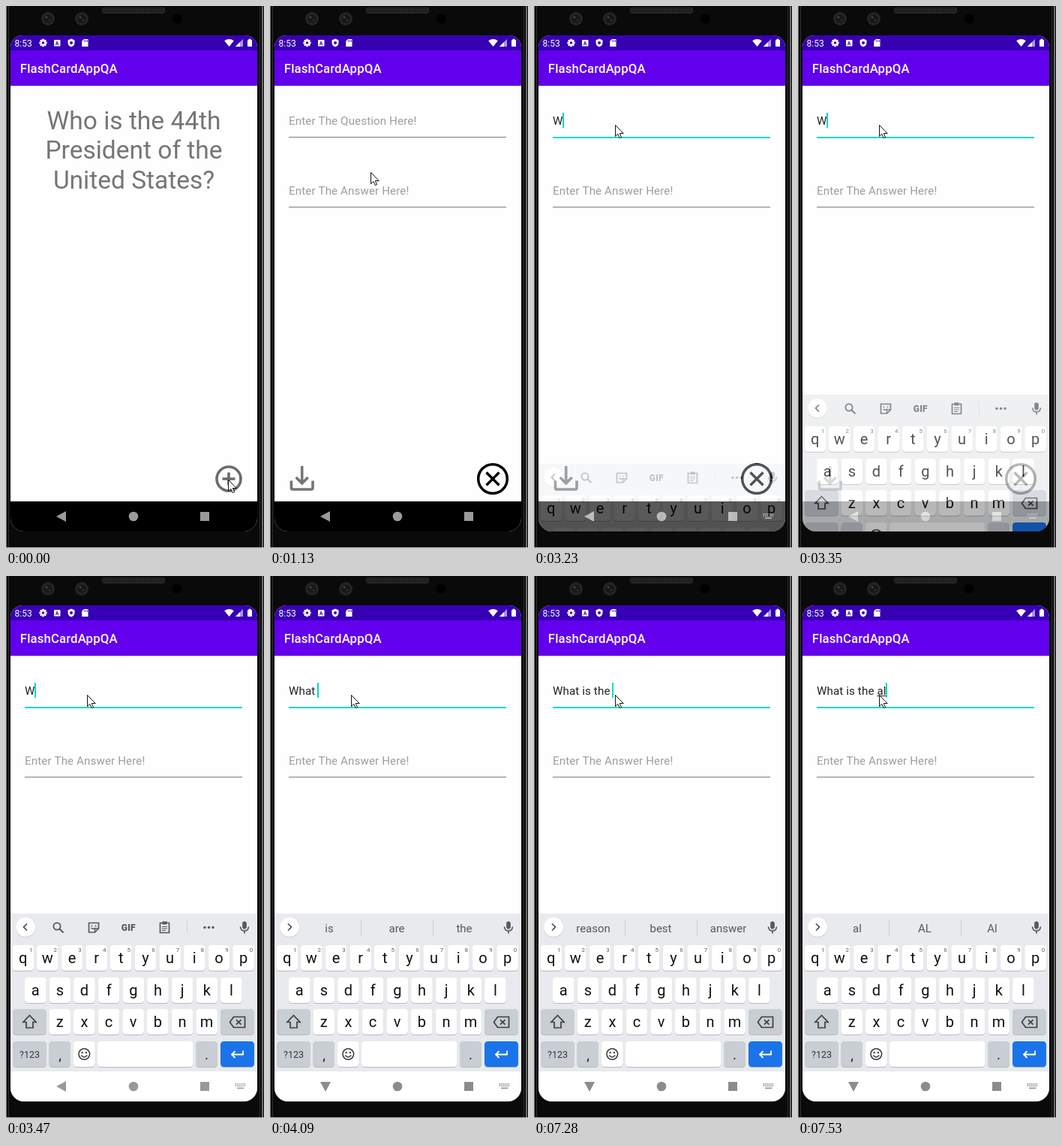
Write an HTML page with a canvas that moves like this. It is 344 px wide and 721 px high and loops after 8000 ms.

```html
<!DOCTYPE html>
<html lang="en">
<head>
<meta charset="utf-8">
<title>Flash card app</title>
<style>
  html, body { margin: 0; width: 100%; height: 100%; overflow: hidden; background: #0a0a0a; }
  canvas { display: block; width: 344px; height: 721px; }
</style>
</head>
<body>
<canvas id="stage"></canvas>
<script>
const W = 344, H = 721, LOOP = 8000;
const ratio = window.devicePixelRatio || 1;

function sized(canvas) {
  canvas.width = W * ratio;
  canvas.height = H * ratio;
  return canvas.getContext('2d');
}
const stage = sized(document.getElementById('stage'));
const layer = sized(document.createElement('canvas'));
let ctx = stage;

const GREY = '#757575', TEAL = '#03dac5', ICON = '#55595e', KEY_BG = '#e8eaed', KEY_DARK = '#c9cdd4';
const FONT = 'Roboto, "Open Sans", sans-serif';

// Screen state: each step overrides the values before it.
const start = {
  form: 0, cursor: [296, 630], focus: false, pressed: false, caret: false,
  imeIcon: false, drop: 0, board: 0, text: '', under: 0, strip: null, turn: 0
};
const steps = [
  [280, { form: 0.5 }],
  [400, { form: 1, cursor: [290, 592] }],
  [520, { cursor: [272, 512] }],
  [890, { cursor: [243, 425] }],
  [1010, { cursor: [172, 285] }],
  [1130, { cursor: [134, 221] }],
  [1380, { cursor: [110, 155] }],
  [1530, { cursor: [110, 146] }],
  [1650, { cursor: [109, 143] }],
  [1770, { cursor: [108, 151] }],
  [1890, { cursor: [108, 158] }],
  [2280, { focus: true, pressed: true, caret: true }],
  [2560, { pressed: false }],
  [2950, { caret: false, imeIcon: true }],
  [3230, { text: 'W', caret: true, drop: 160, board: 0.35 }],
  [3350, { drop: 68, board: 0.72 }],
  [3470, { drop: 0, board: 1 }],
  [3590, { text: 'Wh', under: 2, strip: ['Who', 'What', 'Why'] }],
  [3730, { text: 'Wha', under: 3, strip: ['Wha', 'What', 'Why'], turn: 0.5 }],
  [3850, { text: 'What', under: 4, strip: ['what', 'What', 'Why'], turn: 1 }],
  [4090, { text: 'What ', under: 0, strip: ['is', 'are', 'the'] }],
  [4240, { text: 'What i', under: 1, strip: ['I', 'is', 'it'] }],
  [4360, { text: 'What is', under: 2, strip: ['I', 'is', 'its'] }],
  [4480, { text: 'What is ', under: 0 }],
  [4600, { strip: ['it', 'the', 'your'] }],
  [4850, { text: 'What is th', under: 2 }],
  [7280, { text: 'What is the ', under: 0, strip: ['reason', 'best', 'answer'] }],
  [7400, { text: 'What is the a', under: 1, strip: ['a', 'A', 'and'] }],
  [7530, { text: 'What is the al', under: 2, strip: ['al', 'AL', 'Al'] }]
];

function stateAt(t) {
  const s = { ...start };
  for (const [at, change] of steps) if (t >= at) Object.assign(s, change);
  return s;
}

function rect(x, y, w, h, fill, r = 0) {
  ctx.fillStyle = fill;
  ctx.beginPath();
  ctx.roundRect(x, y, w, h, r);
  ctx.fill();
}

function disc(x, y, r, fill) {
  ctx.fillStyle = fill;
  ctx.beginPath();
  ctx.arc(x, y, r, 0, Math.PI * 2);
  ctx.fill();
}

function ring(x, y, r, width, color) {
  ctx.strokeStyle = color;
  ctx.lineWidth = width;
  ctx.beginPath();
  ctx.arc(x, y, r, 0, Math.PI * 2);
  ctx.stroke();
}

function stroke(d, width, color, x = 0, y = 0) {
  ctx.save();
  ctx.translate(x, y);
  ctx.strokeStyle = color;
  ctx.lineWidth = width;
  ctx.stroke(new Path2D(d));
  ctx.restore();
}

function fill(d, color, x = 0, y = 0, angle = 0) {
  ctx.save();
  ctx.translate(x, y);
  ctx.rotate(angle);
  ctx.fillStyle = color;
  ctx.fill(new Path2D(d));
  ctx.restore();
}

function label(str, x, y, size, color, align = 'left', weight = 400, spacing = 0) {
  ctx.font = `${weight} ${size}px ${FONT}`;
  ctx.letterSpacing = spacing + 'px';
  ctx.textAlign = align;
  ctx.fillStyle = color;
  ctx.fillText(str, x, y);
}

// Blends a whole drawing at once, so overlapping parts do not show through.
function faded(alpha, dy, paint) {
  if (!alpha) return;
  ctx = layer;
  ctx.setTransform(ratio, 0, 0, ratio, 0, 0);
  ctx.clearRect(0, 0, W, H);
  ctx.translate(0, dy);
  paint();
  ctx = stage;
  ctx.globalAlpha = alpha;
  ctx.drawImage(layer.canvas, 0, 0, W, H);
  ctx.globalAlpha = 1;
}

function drawPhone() {
  rect(0, 0, W, H, '#0a0a0a');
  rect(0, 0, 1, H, '#6a6a6a');
  rect(3, 0, 1, H, '#303030');
  rect(338, 0, 1, H, '#303030');
  rect(341, 0, 2, H, '#6a6a6a');
  rect(0, 720, W, 1, '#b4b4b4');
  for (const x of [56, 101]) {
    disc(x, 17, 9, '#222426');
    disc(x, 17, 5.5, '#15181a');
    disc(x - 2, 15, 1.5, '#43484b');
    disc(x + 2, 19, 1.2, '#34393c');
  }
  rect(128, 2, 84, 8, '#262626', 3);
  for (let x = 130; x < 211; x += 3)
    for (let y = 3; y < 9; y += 3) rect(x, y, 1.4, 1.4, '#101010');
  disc(228, 17, 6.5, '#000');
}

function drawBars() {
  rect(6, 39, 329, 20, '#3700b3');
  rect(6, 59, 329, 47, '#6200ee');
  rect(6, 106, 329, 1, '#d2d2d2');
  label('8:53', 11.5, 53.5, 12, '#fff');
  for (let i = 0; i < 4; i++) {
    ctx.save();
    ctx.translate(49.5, 49);
    ctx.rotate(i * Math.PI / 4);
    rect(-1.3, -5.2, 2.6, 10.4, '#fff');
    ctx.restore();
  }
  disc(49.5, 49, 3.8, '#fff');
  disc(49.5, 49, 1.7, '#3700b3');
  rect(64, 45, 8.5, 8.5, '#fff', 1);
  label('A', 68.2, 52, 7, '#3700b3', 'center', 700);
  fill('M0-5.5L4.5-3.6V0Q4.2 4 0 5.5Q-4.2 4-4.5 0V-3.6Z', '#fff', 87, 49);
  disc(87, 49, 2, '#3700b3');
  fill('M-1.5-5H4V5H-4.3V-2.3Z', '#fff', 105.5, 49);
  for (let i = 0; i < 3; i++) rect(104 + i * 2, 45.5, 1, 2, '#3700b3');
  fill('M0 5L-6.3-2.8Q0-7 6.3-2.8Z', '#fff', 297.5, 49);
  fill('M-5 5L5-5V5Z', '#a996dc', 311, 49);
  fill('M-5 5L1-1V5Z', '#fff', 311, 49);
  rect(322, 45, 6, 9, '#fff', 1);
  rect(323.5, 43.7, 3, 2, '#fff');
  label('FlashCardAppQA', 18.8, 89, 16.76, '#fff', 'left', 500, 0.13);
}

function drawCard() {
  ['Who is the 44th', 'President of the', 'United States?'].forEach((line, i) =>
    label(line, 170.5, 164 + i * 39.3, 33.5, GREY, 'center'));
  ring(297, 629, 16, 3.6, '#6c6c6c');
  stroke('M-8.5 0H8.5M0-8.5V8.5', 3.6, '#6c6c6c', 297, 629);
}

function drawForm(s) {
  const field = (str, y, color) => label(str, 25, y, 15.08, color, 'left', 400, 0.14);
  if (s.text) field(s.text, 158, '#212121');
  else field('Enter The Question Here!', 158, s.pressed ? '#737373' : '#9d9d9d');
  const width = ctx.measureText(s.text).width;
  if (s.under) {
    const from = ctx.measureText(s.text.slice(0, -s.under)).width;
    rect(25 + from, 159, width - from, 1, '#212121');
  }
  if (s.caret) rect(Math.max(25, Math.round(24 + width)), 142, 2, 20, TEAL);
  if (s.focus) rect(25, 174, 290, 2, TEAL);
  else rect(25, 174, 290, 1, '#7c7c7c');

  field('Enter The Answer Here!', 251, '#9d9d9d');
  rect(25, 267, 290, 1, '#7c7c7c');

  stroke('M-14.3 2.5V12Q-14.3 14-12.3 14H12.3Q14.3 14 14.3 12V2.5M0-17V6M-8-2L0 6L8-2', 3.6, GREY, 42.7, 629);
  ring(297, 629, 19.3, 3.5, '#000');
  stroke('M-8.5-8.5L8.5 8.5M8.5-8.5L-8.5 8.5', 3.3, '#000', 297, 629);
}

function drawNav(bg, color, s) {
  rect(6, 659, 329, 40, bg);
  fill('M-7 0L6-7V7Z', color, 74, 679, -s.turn * Math.PI / 2);
  disc(170, 679, 6.3, color);
  rect(259, 673, 12, 12, color);
  if (!s.imeIcon) return;
  for (let i = 0; i < 6; i++)
    for (let j = 0; j < 2; j++) rect(305.5 + i * 2.4, 675 + j * 2.5, 1.5, 1.5, color);
  rect(308, 680.5, 9, 1.5, color);
}

function key(x, y, w, color = '#fff') {
  rect(x, y + 1, w, 34, '#b6bac0', 4.5);
  rect(x, y, w, 34, color, 4.5);
}

function keyRow(chars, x, y, digits) {
  [...chars].forEach((c, i) => {
    const cx = x + i * 32.65;
    key(cx - 14.3, y, 28.6);
    label(c, cx, y + 23.5, 20, '#111', 'center');
    if (digits) label(String((i + 1) % 10), cx + 10.5, y + 9, 8, ICON, 'center');
  });
}

function drawToolbar() {
  ring(68, 466, 4.6, 1.8, ICON);
  stroke('M71.5 469.5L76.5 474.5', 2, ICON);
  stroke('M110.5 461.5H123.5V469L118.5 474H110.5Z', 1.7, ICON);
  stroke('M118.5 474V469H123.5M113.5 468Q116 471 118.5 468', 1.3, ICON);
  disc(114.5, 465.5, 0.9, ICON);
  disc(119.5, 465.5, 0.9, ICON);
  label('GIF', 163.3, 471.5, 12, ICON, 'center', 900, 0.3);
  stroke('M205.5 461.5H217.5V474.5H205.5Z', 1.7, ICON);
  rect(208.5, 459.5, 6, 4, ICON);
  stroke('M208 466.5H215M208 469H215M208 471.5H213', 1.2, ICON);
  rect(241, 458, 1, 18, '#d3d6da');
  for (const x of [265, 270.5, 276]) disc(x, 467.5, 1.7, ICON);
}

function drawStrip(words) {
  words.forEach((w, i) => label(w, 79 + i * 90, 473.5, 15, ICON, 'center'));
  for (const x of [121, 217]) rect(x, 458, 1, 20, '#cbced2');
}

function drawKeyboard(s) {
  rect(6, 449, 329, 211, KEY_BG);
  drawNav('#fff', s.turn ? '#8c8c8c' : '#999', s);

  disc(26, 468, 13, '#d2d5d9');
  disc(26, 467, 12.8, '#fff');
  stroke(s.strip ? 'M-2-4.5L2.5 0L-2 4.5' : 'M2-4.5L-2.5 0L2 4.5', 1.7, '#45494d', 26, 467);
  if (s.strip) drawStrip(s.strip);
  else drawToolbar();
  rect(315.2, 459.5, 5.6, 10, ICON, 2.8);
  stroke('M312.5 466.5Q313 472 318 472Q323 472 323.5 466.5M318 472V475.5', 1.7, ICON);

  keyRow('qwertyuiop', 22.7, 491, true);
  keyRow('asdfghjkl', 39.2, 534);
  keyRow('zxcvbnm', 71.7, 576);

  key(9, 576, 45, KEY_DARK);
  stroke('M0-8.5L8.5 0.5H4.5V8H-4.5V0.5H-8.5Z', 1.7, '#3c4043', 31.5, 593);
  key(286, 576, 45, KEY_DARK);
  stroke('M-10 0L-5-7H10V7H-5ZM-1.5-3.2L5 3.2M5-3.2L-1.5 3.2', 1.7, '#3c4043', 308.5, 593.5);

  key(9, 619, 45, KEY_DARK);
  label('?123', 31.5, 640.5, 12.5, '#303336', 'center');
  key(57.5, 619, 28.5, KEY_DARK);
  label(',', 72, 644, 19, '#222', 'center');
  key(90, 619, 28.7);
  ring(104.3, 636, 7.3, 1.6, '#3c4043');
  disc(101.7, 634, 1.2, '#3c4043');
  disc(106.9, 634, 1.2, '#3c4043');
  stroke('M-4 1.5Q0 6.5 4 1.5', 1.5, '#3c4043', 104.3, 636);
  key(122, 619, 127.5);
  key(253, 619, 29, KEY_DARK);
  label('.', 267.5, 643, 19, '#222', 'center');
  key(286, 619, 45, '#1a73e8');
  stroke('M8-4.5V0.5H-7M-2.5-4L-7 0.5L-2.5 5', 1.8, '#fff', 308, 636);
}

function drawCursor([x, y]) {
  const d = 'M0.5 0.5V15.5L3.9 12.4L6.3 17.6L8.6 16.6L6.3 11.5H11.2Z';
  fill(d, '#fff', x, y);
  stroke(d, 1, '#111', x, y);
}

function draw(t) {
  const s = stateAt(t);
  ctx.setTransform(ratio, 0, 0, ratio, 0, 0);
  drawPhone();
  ctx.save();
  ctx.beginPath();
  ctx.roundRect(6, 39, 329, 660, [16, 16, 18, 18]);
  ctx.clip();
  rect(6, 39, 329, 660, '#fefefe');
  drawBars();
  faded(1 - s.form, 0, drawCard);
  faded(s.form, 0, () => drawForm(s));
  drawNav('#000', '#9b9b9b', s);
  faded(s.board, s.drop, () => drawKeyboard(s));
  ctx.restore();
  drawCursor(s.cursor);
}

function tick() {
  draw(performance.now() % LOOP);
  requestAnimationFrame(tick);
}
tick();
</script>
</body>
</html>
```
